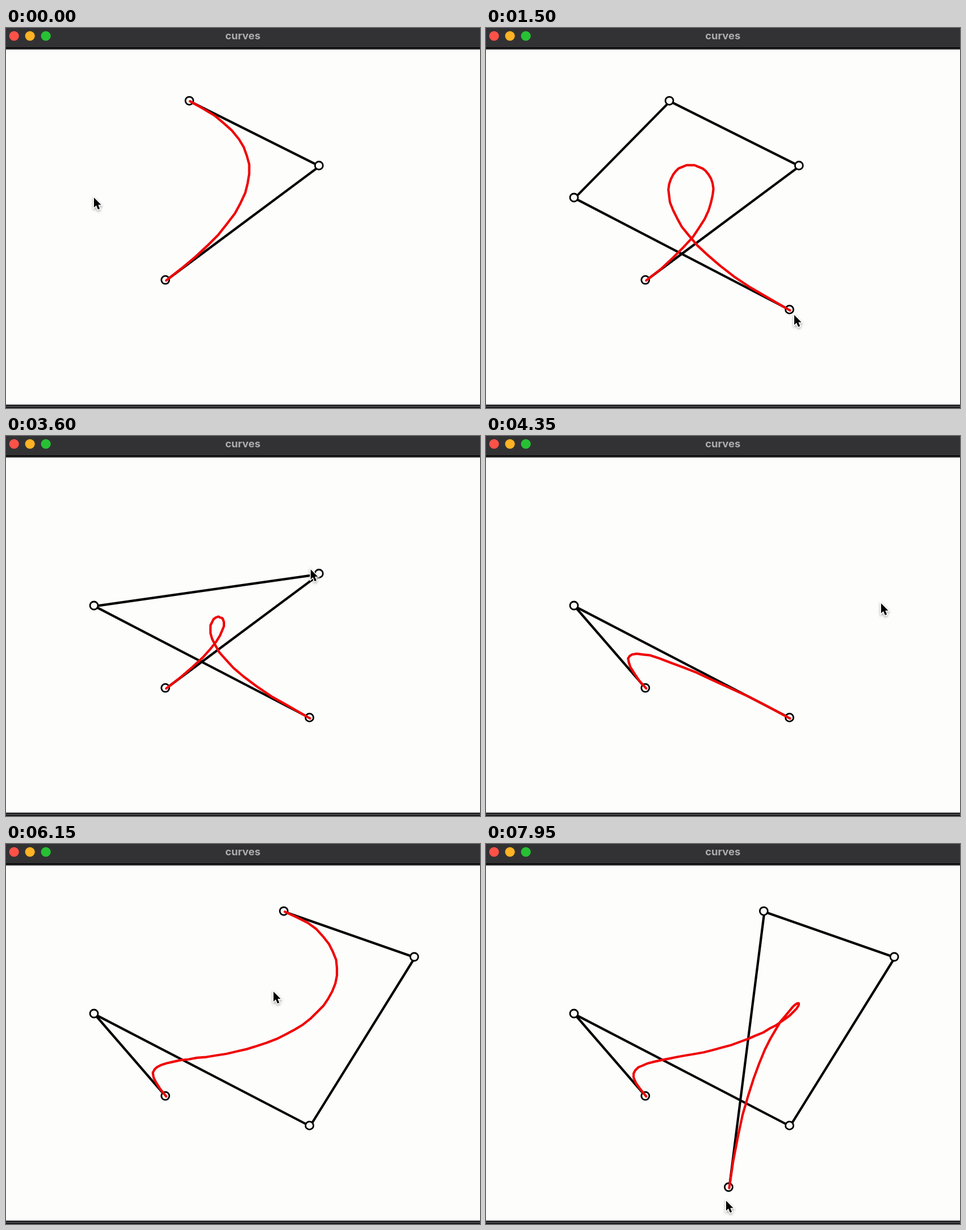
Write an HTML page with a canvas that moves like this. It is 835 px wide and 670 px high and loops after 8000 ms.

```html
<!DOCTYPE html>
<html lang="en">
<head>
<meta charset="utf-8">
<title>curves</title>
<style>
  html, body { margin: 0; width: 100%; height: 100%; overflow: hidden; background: #fdfdfc; }
  canvas { display: block; }
</style>
</head>
<body>
<canvas id="stage" width="835" height="670"></canvas>
<script>
const ctx = document.getElementById('stage').getContext('2d');
const LOOP = 8000, STEP = 50, PIXEL = 1.392, LINE_SHIFT = 1.1;
const PRESS = 100, RELEASE = 50;

const point = (x, y) => ({ x, y });
const start = point(280.7, 444.2);
const right = point(551.3, 242.5);
const top_ = point(323, 128.3);

// What the hand does; the pointer and the control points both follow from it.
const actions = [
  { at: 150, add: point(155, 299) },
  { at: 1250, add: point(534.6, 496.4) },
  { at: 1550, visit: point(543, 506) },
  { at: 3000, remove: top_ },
  { at: 3800, remove: right },
  { at: 4400, visit: point(696, 295) },
  { at: 4900, add: point(719.2, 199) },
  { at: 5600, add: point(489.3, 118.3) },
  { at: 7150, add: point(427.4, 605) },
  { at: 7950, visit: point(423, 629) }
];

const mix = (a, b, k) => a + (b - a) * k;
const blend = (p, q, k) => point(mix(p.x, q.x, k), mix(p.y, q.y, k));
const snap = v => Math.round(v / PIXEL) * PIXEL;
const place = action => action.add || action.remove || action.visit;

function pointsAt(t) {
  let points = [start, right, top_];
  for (const { at, add, remove } of actions) {
    if (at > t) break;
    if (add) points.push(add);
    if (remove) points = points.filter(p => p !== remove);
  }
  return points;
}

// Glide from one action to the next, resting for the press and the release.
function pointerAt(t) {
  const next = actions.findIndex(a => a.at + RELEASE > t);
  const to = actions[next], from = actions[next - 1] || to;
  const leave = from.at + RELEASE, arrive = to.at - PRESS;
  const k = Math.min(1, Math.max(0, (t - leave) / (arrive - leave)));
  return blend(place(from), place(to), k * k * (3 - 2 * k));
}

function bezier(points, k) {
  while (points.length > 1) {
    points = points.slice(1).map((p, i) => blend(points[i], p, k));
  }
  return points[0];
}

function sampleCurve(points) {
  const segments = 10 * (points.length - 1) - 1;
  return Array.from({ length: segments + 1 }, (_, i) => {
    const { x, y } = bezier(points, i / segments);
    return point(snap(x), snap(y));
  });
}

function polyline(points, color) {
  ctx.beginPath();
  points.forEach(p => ctx.lineTo(p.x + LINE_SHIFT, p.y + LINE_SHIFT));
  ctx.strokeStyle = color;
  ctx.lineWidth = 4.2;
  ctx.lineJoin = ctx.lineCap = 'round';
  ctx.stroke();
}

function circle(x, y, r, fill, stroke, width) {
  ctx.beginPath();
  ctx.arc(x, y, r, 0, 2 * Math.PI);
  if (fill) { ctx.fillStyle = fill; ctx.fill(); }
  if (stroke) { ctx.strokeStyle = stroke; ctx.lineWidth = width; ctx.stroke(); }
}

function bar(y, h, color) {
  ctx.fillStyle = color;
  ctx.fillRect(0, y, 835, h);
}

function drawWindow() {
  bar(0, 670, '#fdfdfc');
  bar(0, 34, '#323234');
  bar(34, 2, '#08080a');
  bar(36, 2, '#343436');
  bar(664, 6, '#1b1b1d');
  bar(666, 2, '#4a4a4d');
  ['#ff5147', '#ffb224', '#27c134'].forEach((c, i) => circle(14.2 + 28 * i, 14, 8.6, c));
  ctx.fillStyle = '#acacae';
  ctx.font = '700 18.4px Inter, sans-serif';
  ctx.textAlign = 'center';
  ctx.fillText('curves', 417.3, 20);
}

const arrow = new Path2D('M0 0V17.5L4 13.8L7 21L10.2 19.6L7.3 12.7H12.6Z');

function drawPointer({ x, y }) {
  ctx.save();
  ctx.translate(x, y);
  ctx.shadowColor = 'rgba(0,0,0,.35)';
  ctx.shadowBlur = 4;
  ctx.shadowOffsetY = 2;
  ctx.strokeStyle = '#fff';
  ctx.lineWidth = 3;
  ctx.lineJoin = 'miter';
  ctx.stroke(arrow);
  ctx.shadowColor = 'transparent';
  ctx.fillStyle = '#000';
  ctx.fill(arrow);
  ctx.restore();
}

function draw(t) {
  const points = pointsAt(t);
  const pointer = pointerAt(t);

  drawWindow();
  polyline(points, '#000');
  points.forEach(p => circle(p.x, p.y, 7, '#fdfdfc', '#000', 2.8));
  polyline(sampleCurve(points), '#f00404');
  if (actions.some(a => a.remove && t >= a.at - PRESS && t < a.at)) {
    circle(pointer.x - 0.6, pointer.y + 0.6, 30.3, null, '#10bd18', 2);
  }
  drawPointer(pointer);
}

function tick() {
  draw(Math.floor((performance.now() % LOOP) / STEP) * STEP);
  requestAnimationFrame(tick);
}
tick();
</script>
</body>
</html>
```
